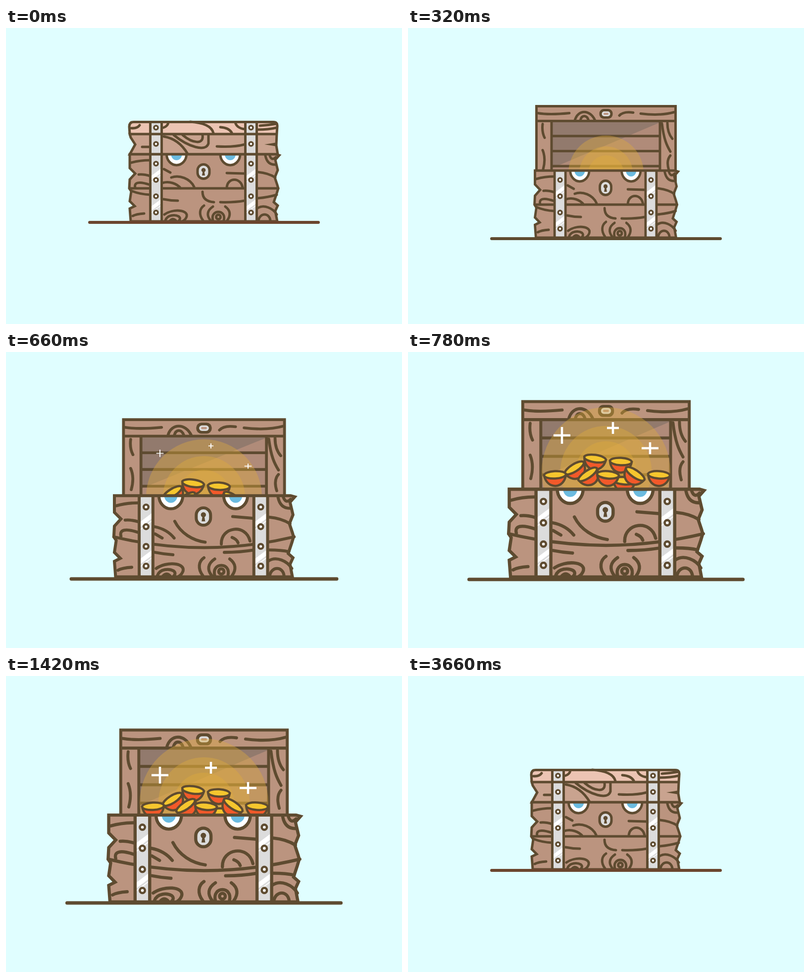
An HTML page for the animation above (3680 ms loop, 800x600 px).

```html
<!DOCTYPE html>
<html lang="en">
<head>
<meta charset="utf-8">
<title>Treasure chest</title>
<style>
html, body { margin: 0; width: 100%; height: 100%; overflow: hidden; background: #e0feff; }
svg { display: block; width: 100%; height: 100%; }
.ink { stroke: #5e4b30; stroke-width: 5; }
.line { fill: none; stroke-linecap: round; }
.wood { fill: #bb947f; }
.metal { fill: #dcdcdc; }
.dark { fill: #5e4b30; }
</style>
</head>
<body>
<svg id="stage" viewBox="0 0 800 600"></svg>
<script>
const LOOP = 3680, OPEN = 300, SMILE = 420, CLOSE = 3420, SHUT = 3400, END = 3660;

const line = d => `<path class="ink line" d="${d}"/>`;

function strap(x, y, h, rivets, glints = []) {
  const shine = glints.map(g =>
    `<path fill="#fff" d="M${x - 10} ${g}l20 -15v9l-20 15z"/>
     <path stroke="#fff" stroke-width="1.5" d="M${x - 10} ${g + 13}l20 -15"/>`).join('');
  const dots = rivets.map(r =>
    `<circle class="ink" cx="${x}" cy="${r}" r="4" fill="#fff" style="stroke-width:3.6"/>`).join('');
  return `<rect class="metal" x="${x - 11.5}" y="${y}" width="23" height="${h}"/>${shine}
    <path class="ink" d="M${x - 11.5} ${y}v${h}M${x + 11.5} ${y}v${h}"/>${dots}`;
}

const eye = x => `<path class="ink" fill="#fff" d="M${x - 20} 256a20 22 0 0 0 40 0"/>
  <path fill="#6bbbe0" d="M${x - 11} 256a11 12 0 0 0 22 0"/>`;

// Front of the box
const edge = `M250 256V284L261 295L250 307L249 325L253 331L250 351L260 361L250 366L252 392
  H548L544 371L549 360L541 353L547 335L550 325L548 318L543 303L549 288L544 267L552 258L545 256z`;
const sideGrain = `M253 273Q270 268 291 268M268 297Q278 296 291 300M261 324C258 313 268 310 291 318
  M256 381Q263 377 279 376M524 259Q528 278 545 277M533 259Q537 270 545 262
  M509 292Q530 294 544 303M507 366C521 356 540 366 547 378M510 390C513 374 532 374 534 390`;
const knots = `M320 378C337 366 368 368 365 382Q363 388 358 391M322 390C326 378 342 378 349 382Q354 386 349 391
  M400 360C391 366 389 378 398 390M418 362C406 370 405 380 413 390M443 362C454 370 454 380 447 390
  M418 390C412 367 446 367 440 390M331 391Q337 384 343 390`;
const flatGrain = `M250 325H550M319 286L332 293M334 303C350 297 372 305 380 322M316 314C330 310 345 315 353 325
  M446 294L482 295M446 324C447 302 475 302 478 324M397 332C397 345 405 352 420 353
  M433 353Q460 354 482 350M318 347Q332 350 347 350M253 330Q270 337 291 338M509 345Q530 343 547 338`;
const smileGrain = `M249 325Q400 361 551 325M351 299C361 319 381 331 402 334M317 308Q338 312 350 327M318 320L330 327
  M448 291L484 294M429 337C428 308 470 302 477 332M447 326Q455 329 457 335
  M434 351Q460 351 484 347M318 351Q333 354 348 355M509 347Q530 347 542 350`;

const body = `<path class="wood" d="${edge}"/>${line(sideGrain)}${line(knots)}
  <g id="flat">${line(flatGrain)}</g><g id="smile">${line(smileGrain)}</g>
  <circle class="ink line" cx="429" cy="383" r="4.5"/>
  ${eye(344.5)}${eye(453)}
  ${[303, 495].map(x => strap(x, 256, 136, [275, 308, 341, 374], [300, 362])).join('')}
  <rect class="ink metal" x="387" y="276.5" width="24" height="29" rx="12"/>
  <path class="dark" d="M397.5 290L396 299H402L400.5 290z"/><circle class="dark" cx="399" cy="288" r="4.3"/>
  <path class="ink" fill="none" d="${edge}"/>`;

// Lid seen from the front
const lidTop = 'M250 215L249 200Q249 190.5 258 190.5H540Q549 190.5 548 200L547 215z';
const lidLow = 'M250 215L252 222L261 236L250 256H549L546 238L547 215z';
const lidGrain = `M253 203Q265 204 270 197M318 202Q327 199 328 191M372 190C400 192 416 200 419 213
  M433 201Q450 202 456 212M463 191Q466 203 482 205M509 206Q530 206 547 202M513 198Q530 197 547 194
  M275 241H290M319 220C344 224 358 240 367 255M339 217C368 241 404 252 409 234V216
  M357 217C377 234 400 237 397 217M426 240Q460 242 482 236`;
const shutLid = `<path fill="#ecc4b3" d="${lidTop}"/><path fill="#c9a38f" d="${lidLow}"/>
  ${line(lidGrain)}<path class="dark" d="M522 236L547 232V240z"/>
  ${[303, 495].map(x => strap(x, 190, 66, [202, 235])).join('')}
  <path class="ink" fill="none" d="${lidTop}${lidLow}"/>`;

// Lid seen from inside, its top edge at y = 0
const frameGrain = `M262 14Q285 18 326 14M337 29C343 6 368 6 378 29M348 29C351 17 361 17 365 29
  M427 19Q435 10 455 13M470 15Q510 20 538 12M272 36Q270 52 276 64M272 89Q279 106 273 128
  M513 35C517 68 523 80 530 92M524 34Q524 54 534 66M527 130Q521 110 530 100`;
const openLid = `<rect class="wood" x="259.5" y="0" width="281" height="155"/>
  <rect fill="#b08b79" x="290" y="30" width="219" height="125"/>
  <path fill="#927a6d" d="M290 30H509V33L290 126z"/>
  <path class="ink" d="M290 60.5H509M290 91H509M290 121.5H509"/>
  ${line(frameGrain)}
  <path class="ink" fill="none" d="M259.5 155V0H540.5V155M259.5 30H540.5M290 30V155M509 30V155"/>
  <rect class="dark" x="386.5" y="5.5" width="27" height="20" rx="9"/>
  <rect class="metal" x="391.5" y="10.5" width="17" height="10" rx="5"/>
  <rect class="wood" x="395" y="13.5" width="10" height="4" rx="2"/>`;

const coin = ([x, y, a]) => `<g class="ink" style="stroke-width:4.5" transform="translate(${x} ${y}) rotate(${a})">
  <path fill="#f2592a" d="M-22 0C-18 30 18 30 22 0z"/><ellipse fill="#f5c62e" rx="22" ry="7.5"/></g>`;
const coins = [[437, 261, 4], [430, 222, 3], [378, 216, 8], [336, 235, -32], [363, 248, -34],
  [459, 247, 34], [404, 249, 5], [297, 249, -3], [507, 249, 4]];

const sparks = [[311, 169, 17, 17], [414, 154, 12, 12], [489, 195, 17, 12]];
const spark = ([, , w, h]) =>
  `<path class="spark" stroke="#fff" stroke-width="4.5" d="M${-w} 0H${w}M0 ${-h}V${h}"/>`;

document.getElementById('stage').innerHTML = `<rect width="800" height="600" fill="#e0feff"/>
  <g id="open">${openLid}</g>
  <g id="glow" fill="#dfaa3c" fill-opacity=".38">
    <circle r="1"/><circle r=".71"/><circle r=".47"/></g>
  <g id="coins">${coins.map(coin).join('')}</g>
  <g id="sparks">${sparks.map(spark).join('')}</g>
  <g id="shut">${shutLid}</g>
  <g id="body">${body}</g>
  <path id="ground" d="M-231 0H231" stroke-width="6" stroke-linecap="round"/>`;

// Each track is a list of [time, value]
const tracks = {
  groundY: [[0, 394], [320, 427], [540, 454], [700, 462], [780, 461], [1420, 460], [SHUT, 460], [END, 394]],
  groundS: [[0, 1], [540, 1], [700, 1.214], [780, 1.197], [SHUT, 1.197], [END, 1]],
  base: [[0, 392], [320, 425], [540, 452], [700, 457], [780, 456], [1000, 459], [1420, 458], [SHUT, 458], [END, 392]],
  bodyX: [[0, 1], [300, .955], [320, .957], [540, 1], [720, 1.31], [780, 1.303], [1000, 1.275], [1100, 1.285], [1420, 1.283], [SHUT, 1.283], [END, 1]],
  bodyY: [[0, 1], [540, 1], [720, 1.315], [780, 1.308], [1000, 1.285], [1420, 1.295], [SHUT, 1.295], [END, 1]],
  openTop: [[300, 156.5], [320, 158.5], [540, 183.5], [760, 98.5], [780, 100.5], [920, 110.5], [1020, 109], [1420, 109.5]],
  openX: [[540, 1], [700, 1.21], [780, 1.197]],
  openY: [[540, 1], [780, 1.22]],
  shutX: [[0, 1], [300, .945], [SHUT, 1.12], [END, 1]],
  shutY: [[0, 1], [300, 1.956], [SHUT, 2.47], [END, 1]],
  glowY: [[300, 290], [320, 294], [540, 346], [780, 242], [940, 260], [1040, 256], [1420, 257]],
  glowR: [[300, 70], [320, 76], [540, 104], [780, 130]],
  coinY: [[540, 115], [760, -4], [780, 0], [920, 18], [1020, 14], [1420, 15]],
  sparkY: [[600, 60], [760, -3], [780, 0], [950, 35], [1050, 31], [1420, 32]],
  sparkS: [[600, 0], [740, 1]],
  red: [[0, 1], [320, 0], [SHUT, 0], [END, 1]]
};

function at(keys, t) {
  if (t <= keys[0][0]) return keys[0][1];
  for (let i = 1; i < keys.length; i++) {
    const [a, u] = keys[i - 1], [b, v] = keys[i];
    if (t < b) return u + (v - u) * (t - a) / (b - a);
  }
  return keys[keys.length - 1][1];
}

const el = id => document.getElementById(id);
const show = (id, on) => el(id).setAttribute('display', on ? 'inline' : 'none');
const place = (node, x, y, sx = 1, sy = sx, ox = 0, oy = 0) =>
  node.setAttribute('transform', `translate(${x} ${y}) scale(${sx} ${sy}) translate(${-ox} ${-oy})`);
const sparkNodes = document.querySelectorAll('.spark');

function draw(ms) {
  // The closing move eases out
  const t = ms > SHUT
    ? SHUT + (END - SHUT) * Math.sin(Math.min(1, (ms - SHUT) / (END - SHUT)) * Math.PI / 2) : ms;
  const v = {};
  for (const k in tracks) v[k] = at(tracks[k], t);
  const isOpen = ms >= OPEN && ms < CLOSE;
  const smiles = ms >= SMILE && ms < CLOSE;

  for (const id of ['open', 'glow', 'coins', 'sparks']) show(id, isOpen);
  show('coins', isOpen && ms > 540);
  show('shut', !isOpen);
  show('smile', smiles);
  show('flat', !smiles);

  place(el('body'), 400, v.base, v.bodyX, v.bodyY, 400, 392);
  place(el('shut'), 400, v.base - 136 * v.bodyY, v.shutX, v.shutY, 400, 256);
  place(el('open'), 400, v.openTop, v.openX, v.openY, 400, 0);
  place(el('glow'), 400, v.glowY, v.glowR);
  place(el('coins'), 0, v.coinY);
  sparkNodes.forEach((n, i) => place(n, sparks[i][0], sparks[i][1] + v.sparkY, v.sparkS));
  place(el('ground'), 400, v.groundY, v.groundS);
  const mix = (a, b) => Math.round(a + (b - a) * v.red);
  el('ground').setAttribute('stroke', `rgb(${mix(94, 107)},${mix(75, 69)},${mix(48, 46)})`);
}

let start;
function tick(now) {
  if (start === undefined) start = now;
  draw((now - start) % LOOP);
  requestAnimationFrame(tick);
}
draw(0);
requestAnimationFrame(tick);
</script>
</body>
</html>
```
